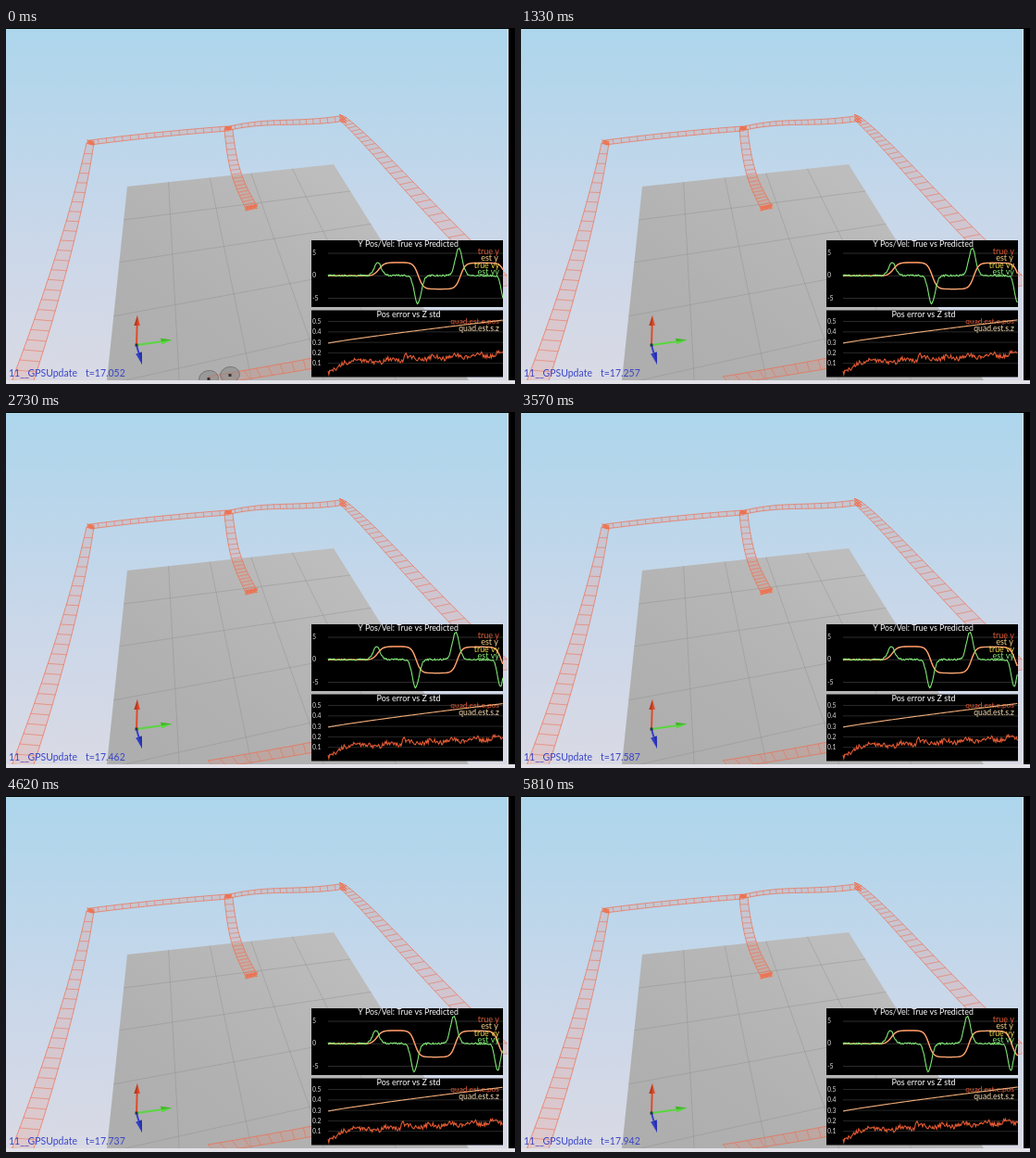
An HTML page with a canvas that plays this animation: 550x384 px, repeating every 5880 ms.

```html
<!DOCTYPE html>
<html lang="en">
<head>
<meta charset="utf-8">
<title>Flight simulator</title>
<style>
html, body { margin: 0; width: 550px; height: 384px; overflow: hidden; background: #000; }
canvas { display: block; }
</style>
</head>
<body>
<canvas id="stage" width="550" height="384"></canvas>
<script>
const ctx = document.getElementById('stage').getContext('2d');
const LOOP = 5880, STEP = 70;
const TRAIL = 'rgba(240,105,72,.75)', GRID = 'rgba(140,140,140,.45)';
const PEACH = '#f2ad78', RED = '#e25a34', GREEN = '#80e676', BLUE = '#3a45c8';

const lerp = (a, b, u) => a + (b - a) * u;
const mix = (p, q, u) => [lerp(p[0], q[0], u), lerp(p[1], q[1], u)];
const bell = (t, mid, w) => Math.exp(-(((t - mid) / w) ** 2));
const ramp = (t, mid, w) => 1 / (1 + Math.exp((mid - t) / w));

function trace(pts) {
  ctx.beginPath();
  pts.forEach(([x, y]) => ctx.lineTo(x, y));
}
function line(pts, color, width = 1) {
  trace(pts);
  ctx.strokeStyle = color;
  ctx.lineWidth = width;
  ctx.stroke();
}
function shape(pts, color) {
  trace(pts);
  ctx.fillStyle = color;
  ctx.fill();
}
function box(x, y, w, h, color) {
  ctx.fillStyle = color;
  ctx.fillRect(x, y, w, h);
}
function text(str, x, y, size, color, align = 'left') {
  ctx.font = `${size}px Lato, "Open Sans", sans-serif`;
  ctx.textAlign = align;
  ctx.fillStyle = color;
  ctx.fillText(str, x, y);
}
function fade(x0, y0, x1, y1, ...stops) {
  const g = ctx.createLinearGradient(x0, y0, x1, y1);
  stops.forEach((c, i) => g.addColorStop(i / (stops.length - 1), c));
  return g;
}
function seeded(seed) {
  return () => (seed = (seed * 16807) % 2147483647) / 2147483647;
}

// Point at u (0..1) on a Bezier curve through control points
function bezier(pts, u) {
  if (pts.length === 1) return pts[0];
  return bezier(pts.slice(1).map((p, i) => mix(pts[i], p, u)), u);
}

// Ladder along a curve; each rung reaches half a vector to both sides
function ribbon(curve, from, to, rungs, ease = 1) {
  const rail = (u, side) => {
    const p = bezier(curve, u), h = mix(from, to, u);
    return [p[0] + side * h[0], p[1] + side * h[1]];
  };
  const left = [], right = [];
  for (let i = 0; i <= 40; i++) {
    left.push(rail(i / 40, -1));
    right.push(rail(i / 40, 1));
  }
  shape([...left, ...right.slice().reverse()], 'rgba(240,125,95,.18)');
  line(left, TRAIL, 0.9);
  line(right, TRAIL, 0.9);
  for (let i = 0; i <= rungs; i++) {
    const u = (i / rungs) ** ease;
    line([rail(u, -1), rail(u, 1)], TRAIL, 0.7);
  }
}
function knot(x, y, w, h, tilt) {
  for (let i = -2; i <= 2; i++) {
    const dy = h * i / 2, k = i % 2 ? 0.8 : 1;
    line([[x - w * k, y + dy + tilt], [x + w * k, y + dy - tilt]], '#f06f4a');
  }
}

function drawGround() {
  const [a, b, c, d] = [[131, 171], [354, 147], [500, 380], [109, 380]];
  shape([a, b, c, d], fade(330, 150, 170, 380, '#bdbdbd', '#b6b6b6', '#b1b1b1', '#aeaeae'));
  for (let i = 1; i < 5; i++) line([mix(a, b, i / 5), mix(d, c, i / 5)], GRID, 0.9);
  // Rows grow by a constant ratio towards the viewer
  const row = (first, ratio, i) => first * (ratio ** i - 1) / (ratio - 1);
  for (let i = 1; i < 5; i++) {
    line([mix(a, d, row(36, 1.27, i) / 209), mix(b, c, row(29, 1.22, i) / 233)], GRID, 0.9);
  }
}

function drawTrails() {
  ribbon([[91, 124], [78, 195], [52, 285], [18, 381]], [4, 0], [11.5, 1], 24, 0.92);
  ribbon([[91, 123.5], [165, 114], [240, 108.5]], [0.4, 2.5], [0.4, 2.5], 17);
  ribbon([[240, 108.5], [283, 98], [315, 105], [364, 97.5]], [0.3, 2], [0.3, 3], 17);
  ribbon([[240.5, 109], [245, 158], [254, 172], [265, 193]], [4.5, 0], [6, -1.5], 18);
  ribbon([[364, 98], [397, 125], [440, 180], [541, 278]], [4, -1], [10, -2], 30);
  ribbon([[222, 380], [280, 371], [335, 361]], [4, 4], [1, 5.5], 9);
  knot(91.5, 123.5, 4, 1.8, -0.8);
  knot(240, 108, 4, 1.6, 0.5);
  knot(364, 98, 4, 3, -1.8);
  knot(265, 193.5, 7, 2, 1.5);
}

function arrow(tx, ty, color, dark, head, half) {
  const x = 141, y = 342, len = Math.hypot(tx - x, ty - y);
  const ux = (tx - x) / len, uy = (ty - y) / len;
  const bx = tx - ux * head, by = ty - uy * head;
  line([[x, y], [bx, by]], color, 2);
  shape([[bx - uy * half, by + ux * half], [tx, ty], [bx + uy * half, by - ux * half]], color);
  shape([[bx, by], [tx, ty], [bx + uy * half, by - ux * half]], dark);
}

function drawRotor(x, y) {
  ctx.beginPath();
  ctx.ellipse(x, y, 10.5, 8.5, -0.15, 0, 7);
  ctx.fillStyle = 'rgba(135,135,135,.55)';
  ctx.fill();
  ctx.strokeStyle = '#777';
  ctx.lineWidth = 1;
  ctx.stroke();
  box(x - 1.5, y - 1, 3, 3, '#333');
}

// Signals over flight time t in seconds, as heights on the stage
const position = t => 267.3 - 14.3 * ramp(t, 4.96, 0.26) + 28.6 * ramp(t, 8.8, 0.24)
  - 28.2 * ramp(t, 12.9, 0.24) + 28.6 * ramp(t, 17.3, 0.24);
const velocity = t => 267 - 13.5 * bell(t, 4.85, 0.5) + 30 * bell(t, 8.75, 0.48)
  - 29.5 * bell(t, 12.75, 0.48) + 29 * bell(t, 17.2, 0.4);
const spread = t => 340 - 25.5 * (t / 17.5) ** 0.9;
const error = t => 362.5 - 0.65 * t + 10 * Math.exp(-t / 0.8) - 7 * bell(t, 2.7, 0.4)
  - 8 * bell(t, 7.6, 0.15) + 1.8 * Math.sin(2.9 * t);

// The whole flight so far always fills the plot width
function plot(signal, now, color, width, jitter = 0) {
  const rnd = seeded(417), pts = [];
  for (let t = 0; t <= now; t += 0.08) {
    pts.push([348 + 189 * t / now, signal(t) + (rnd() - 0.5) * jitter]);
  }
  line(pts, color, width);
}

function drawPanels(now) {
  box(330, 229, 207, 72, '#000');
  box(330, 304.5, 207, 72, '#000');

  for (let i = -1; i <= 1; i++) {
    const y = 267.3 - i * 24.3;
    line([[348, y], [537, y]], '#3c3c3c', 0.8);
    text(5 * i, 331, y + 2, 7, '#ddd');
  }
  plot(position, now, RED, 1.4);
  plot(position, now, PEACH, 1.1);
  plot(velocity, now, GREEN, 1.1, 1.9);
  text('Y Pos/Vel: True vs Predicted', 434.5, 236.3, 8.8, '#fff', 'center');
  text('true y', 533, 243.5, 9, RED, 'right');
  text('est y', 532, 251, 9, '#f8cf85', 'right');
  text('true vy', 533, 258.5, 8.8, '#f0d84a', 'right');
  text('est vy', 533, 266, 9, GREEN, 'right');

  for (let i = 1; i <= 5; i++) {
    const y = 373 - i * 11.3;
    line([[348, y], [537, y]], '#333', 0.8);
    text('0.' + i, 331, y + 2.5, 6.8, '#ddd');
  }
  plot(error, now, RED, 1.1, 5);
  text('Pos error vs Z std', 435, 311.8, 9, '#fff', 'center');
  text('quad.est.e.pos', 533, 319, 8.4, RED, 'right');
  text('quad.est.s.z', 533, 327, 8.6, '#f8dfb4', 'right');
  plot(spread, now, PEACH, 1.1);
}

// Flight time in seconds, moving in steps of 5 ms
const CLOCK = [[0, 52], [1890, 342], [4620, 737], [5810, 942]];
function clockAt(ms) {
  let k = 0;
  while (k < CLOCK.length - 2 && ms >= CLOCK[k + 1][0]) k++;
  const [a, b] = [CLOCK[k], CLOCK[k + 1]];
  const v = lerp(a[1], b[1], (ms - a[0]) / (b[0] - a[0]));
  return 17 + (Math.round((v - 2) / 5) * 5 + 2) / 1000;
}

function draw(ms) {
  const now = clockAt(ms);
  box(0, 0, 550, 384, '#000');
  box(0, 380, 550, 4, '#e2e2e8');
  ctx.save();
  ctx.beginPath();
  ctx.rect(0, 1, 543, 379);
  ctx.clip();
  box(0, 1, 543, 379, fade(0, 2, 0, 380, '#add6ec', '#b9d6eb', '#c6d7ea', '#d0d8e8', '#d9dae4'));
  drawGround();
  drawTrails();
  const drift = ms * 0.02;
  if (drift < 18) {
    drawRotor(219 - drift * 0.4, 378 + drift);
    drawRotor(242 - drift * 0.4, 374 + drift);
  }
  arrow(147, 363, '#3440cc', '#2430a4', 13, 3.4);
  arrow(179.5, 336.5, '#5ad640', '#45b52e', 12, 3.4);
  arrow(142, 310, '#e04a28', '#b53a20', 11, 3.2);
  box(139.5, 340.5, 3, 3, '#26364a');
  ctx.restore();
  box(542, 1, 1, 379, '#dfe4ea');
  drawPanels(now);
  text('11__', 3, 375.5, 10.5, BLUE);
  text('GPSUpdate', 23.5, 375.5, 10.5, BLUE);
  text('t=' + now.toFixed(3), 86, 375.5, 10.5, BLUE);
}

const start = performance.now();
function tick() {
  const ms = Math.max(0, performance.now() - start) % LOOP;
  draw(Math.floor(ms / STEP) * STEP);
  requestAnimationFrame(tick);
}
tick();
</script>
</body>
</html>
```
